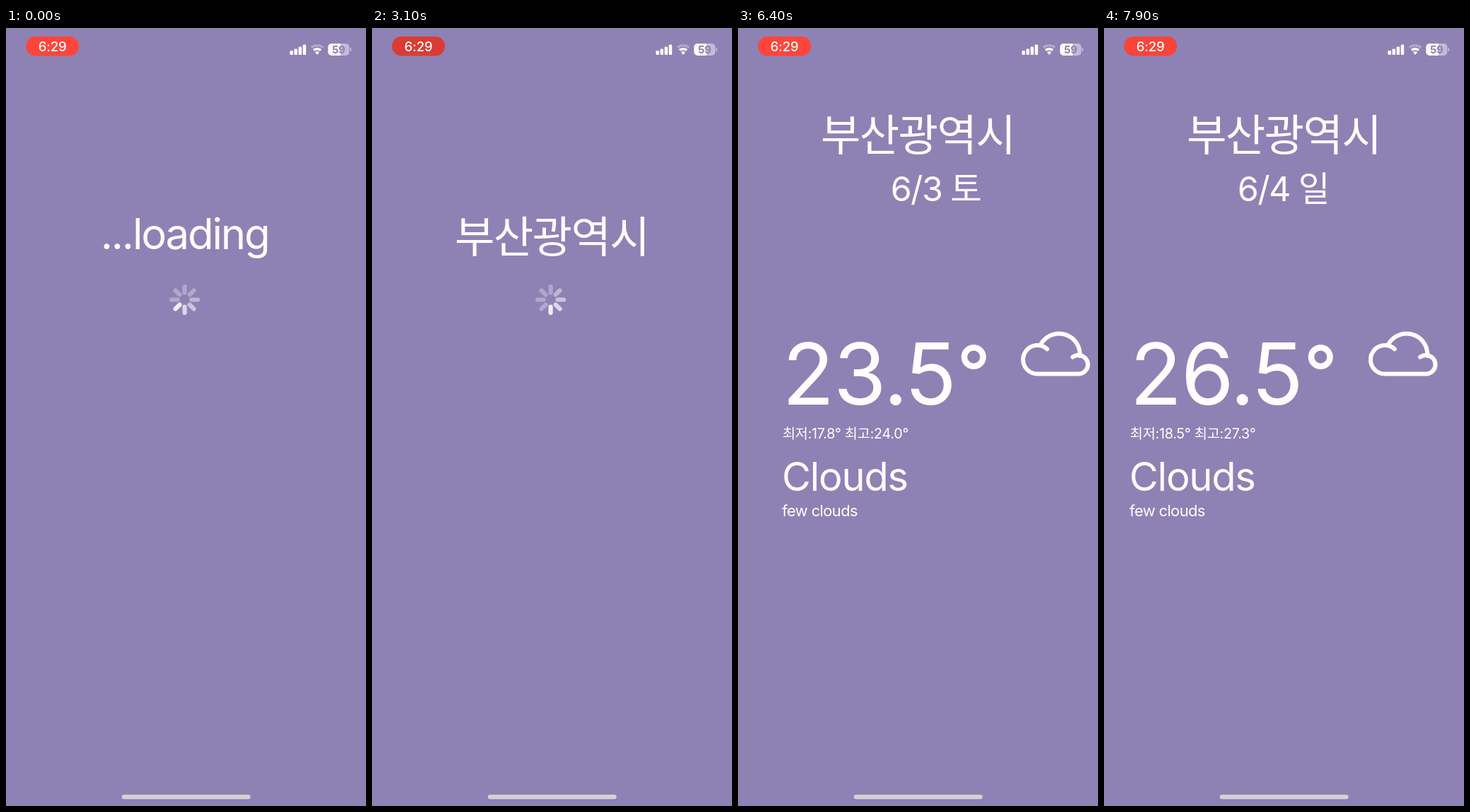
An HTML page with a canvas that plays this animation: 509 by 1101 pixels, repeating every 8000 ms.

```html
<!DOCTYPE html>
<html lang="ko">
<head>
<meta charset="utf-8">
<title>Weather</title>
<style>
  html, body { margin: 0; width: 100%; height: 100%; overflow: hidden; background: #8e82b4; }
  canvas { display: block; width: 509px; height: 1101px; }
</style>
</head>
<body>
<canvas id="stage"></canvas>
<script>
const W = 509, H = 1101, LOOP = 8000;
const BG = '#8e82b4', INK = '#fffdfe';
const FONT = 'Inter, "Noto Sans CJK KR", "Noto Sans CJK", sans-serif';
const HANGUL = '"Noto Sans CJK KR", "Noto Sans CJK", sans-serif';
const CITY_AT = 2900, DATA_AT = 4100;
const DRAG = { time: 500, dist: 271.5 };
const RELEASES = [6242, 7500];
const RAD = Math.PI / 180;

const days = [
  { date: '6/2 금', temp: '26.8', range: '최저:18.8° 최고:27.4°', main: 'Rain', note: 'light rain', icon: rainIcon },
  { date: '6/3 토', temp: '23.5', range: '최저:17.8° 최고:24.0°', main: 'Clouds', note: 'few clouds', icon: cloud },
  { date: '6/4 일', temp: '26.5', range: '최저:18.5° 최고:27.3°', main: 'Clouds', note: 'few clouds', icon: cloud }
];

const canvas = document.getElementById('stage');
const ctx = canvas.getContext('2d');
const ratio = window.devicePixelRatio || 1;
canvas.width = W * ratio;
canvas.height = H * ratio;

const clamp = v => Math.min(1, Math.max(0, v));
const white = a => `rgba(255,255,255,${a})`;

// Draws a line of text and returns its advance width
function text(str, x, y, size, { align = 'left', track = -0.022, weight = 400, family = FONT, color = INK } = {}) {
  ctx.font = `${weight} ${size}px ${family}`;
  ctx.letterSpacing = `${track * size}px`;
  ctx.textAlign = align;
  ctx.fillStyle = color;
  ctx.fillText(str, x, y);
  return ctx.measureText(str).width;
}

function box(x, y, w, h, r, color) {
  ctx.fillStyle = color;
  ctx.beginPath();
  ctx.roundRect(x, y, w, h, r);
  ctx.fill();
}

function line(x1, y1, x2, y2) {
  ctx.beginPath();
  ctx.moveTo(x1, y1);
  ctx.lineTo(x2, y2);
  ctx.stroke();
}

function pen(color, width) {
  ctx.strokeStyle = color;
  ctx.lineWidth = width;
  ctx.lineCap = 'round';
  ctx.lineJoin = 'round';
}

function cloud(k = 1, dx = 0, dy = 0) {
  const arc = (x, y, r, from, to, back) =>
    ctx.arc(x * k + dx, y * k + dy, r * k, from * RAD, to * RAD, back);
  pen(INK, 6);
  ctx.beginPath();
  arc(397, 469.3, 20.3, -48, -270, true);
  arc(455, 476.2, 13.3, 90, -128, true);
  ctx.stroke();
  ctx.beginPath();
  arc(427.5, 462, 29.5, -151, 4, false);
  ctx.stroke();
}

function rainIcon() {
  cloud(0.905, 15.8, 41.1);
  ctx.beginPath();
  ctx.arc(444, 467, 18, -145 * RAD, 0);
  ctx.stroke();
  ctx.beginPath();
  ctx.moveTo(425, 484);
  ctx.arc(458.5, 474.7, 9.3, 90 * RAD, -122 * RAD, true);
  ctx.stroke();
  line(401, 487, 387, 500.5);
  line(413, 496, 397.5, 511.5);
  line(443, 487, 428.5, 500.5);
}

function ring(r1, r2, color) {
  const x = 440, y = 38, a = -128 * RAD, b = -52 * RAD;
  ctx.fillStyle = color;
  ctx.beginPath();
  ctx.arc(x, y, r2, a, b);
  ctx.arc(x, y, r1, b, a, true);
  ctx.fill();
}

function statusBar(t) {
  // Recording pill: soft pulse with a rest at each end
  const lit = clamp(0.5 - 0.75 * Math.cos((t - 1250) / 2000 * 2 * Math.PI));
  const mix = (a, b) => Math.round(a + (b - a) * lit);
  box(28.2, 12, 75, 27.5, 13.7, `rgb(${mix(218, 255)},${mix(60, 69)},${mix(53, 59)})`);
  text('6:29', 65.6, 32.8, 18.6, { align: 'center', weight: 500, track: -0.01 });

  for (let i = 0; i < 4; i++) {
    const h = [6, 8.6, 11.6, 14.6][i];
    box(401.4 + i * 6.1, 38 - h, 4.5, h, 1.3, INK);
  }
  ring(11.7, 14.9, white(0.32));
  ring(6.6, 10, INK);
  ring(0, 4.9, INK);

  ctx.save();
  ctx.beginPath();
  ctx.roundRect(455.4, 22, 30, 17, 5);
  ctx.clip();
  box(455, 22, 31, 17, 0, white(0.45));
  box(455, 22, 18, 17, 0, INK);
  ctx.restore();
  box(486.5, 27.8, 1.6, 5.4, [0, 1.6, 1.6, 0], white(0.5));
  text('59', 470.3, 36, 15, { align: 'center', weight: 700, track: -0.02, color: BG });
}

function spinner(t) {
  const head = 5 + Math.floor(t / 100);
  const glow = [0.87, 0.68, 0.52, 0.42];
  for (let i = 0; i < 8; i++) {
    const age = (head - i + 8) % 8;
    ctx.save();
    ctx.translate(252.6, 384.5);
    ctx.rotate(i * 45 * RAD);
    pen(white(glow[age] || 0.3), 6.2);
    line(0, -10, 0, -18.4);
    ctx.restore();
  }
}

// Drag speeds up, then a damped spring carries the page to rest
function swipe(t) {
  if (t < -DRAG.time) return 0;
  if (t < 0) return DRAG.dist * (1 + t / DRAG.time) ** 2;
  const left = W - DRAG.dist, w = 1 / 45, v = 2 * DRAG.dist / DRAG.time;
  return W - (left + (left * w - v) * t) * Math.exp(-w * t);
}

function dayPage(day, x) {
  if (Math.abs(x) >= W) return;
  ctx.save();
  ctx.translate(x, 0);
  text(day.date, 253, 244.6, 48.5, { align: 'center', track: -0.034 });
  const width = text(day.temp, 36.2, 533, 121, { track: -0.012 });
  text('°', 38 + width, 525, 105, { weight: 500 });
  text(day.range, 36.5, 581.3, 19.8, { track: -0.015 });
  text(day.main, 35.6, 655, 56.2, { track: -0.023 });
  text(day.note, 35.8, 691, 22, { track: -0.03 });
  day.icon();
  ctx.restore();
}

function draw(t) {
  ctx.setTransform(ratio, 0, 0, ratio, 0, 0);
  ctx.fillStyle = BG;
  ctx.fillRect(0, 0, W, H);
  statusBar(t);

  if (t < CITY_AT) {
    text('...loading', 252.7, 312.5, 60, { align: 'center', track: -0.037 });
  } else {
    text('부산광역시', 254, t < DATA_AT ? 318 : 174, 61.5,
      { align: 'center', track: -0.029, weight: 350, family: HANGUL });
  }

  if (t < DATA_AT) {
    spinner(t);
  } else {
    const scroll = RELEASES.reduce((sum, r) => sum + swipe(t - r), 0);
    days.forEach((day, i) => dayPage(day, i * W - scroll));
  }
  box(163.7, 1085, 182, 6.2, 3.1, '#d6d2d1');
}

const start = performance.now();
function tick() {
  draw((performance.now() - start) % LOOP);
  requestAnimationFrame(tick);
}
tick();
</script>
</body>
</html>
```
